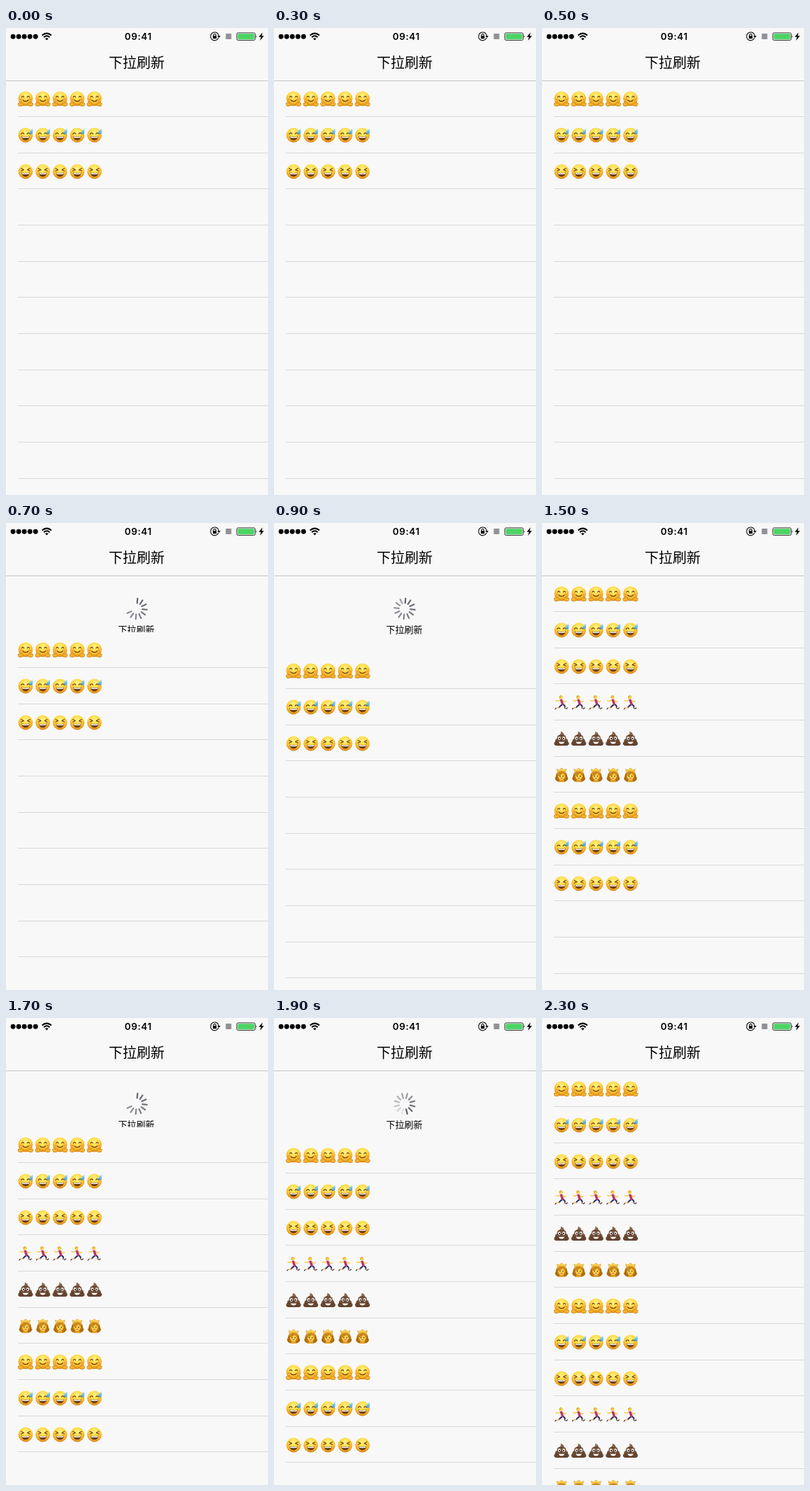
Recreate the animation shown at these times as an HTML page. Size 375 by 667 pixels, loop 2.4 s.

```html
<!DOCTYPE html>
<html lang="zh-CN">
<head>
<meta charset="utf-8">
<title>下拉刷新</title>
<style>
  html, body { margin: 0; width: 100%; height: 100%; overflow: hidden; background: #f8f8f8; }
  svg { display: block; }
  text { text-anchor: middle; font-family: "Noto Sans CJK SC", "Noto Sans CJK", sans-serif; }
  .clock { font: 600 13.5px Inter, sans-serif; letter-spacing: .55px; }
  .title { font-size: 20px; font-weight: 500; }
  .hint { font-size: 13px; }
  .line { fill: none; stroke-linecap: round; stroke-linejoin: round; }
</style>
</head>
<body>
<svg width="375" height="667" viewBox="0 0 375 667">
  <defs>
    <radialGradient id="skin" cx=".5" cy=".3" r=".72">
      <stop offset="0" stop-color="#fff38a"/>
      <stop offset=".45" stop-color="#fdd943"/>
      <stop offset=".8" stop-color="#f0a624"/>
      <stop offset="1" stop-color="#c97c14"/>
    </radialGradient>
    <linearGradient id="mud" x2="0" y2="1">
      <stop offset="0" stop-color="#8f6a50"/>
      <stop offset="1" stop-color="#60402c"/>
    </linearGradient>
    <linearGradient id="hair" x2="0" y2="1">
      <stop offset="0" stop-color="#e2a02a"/>
      <stop offset="1" stop-color="#a8660e"/>
    </linearGradient>
    <linearGradient id="drop" x2="0" y2="1">
      <stop offset="0" stop-color="#b9e6fb"/>
      <stop offset="1" stop-color="#2f9fe0"/>
    </linearGradient>

    <circle id="face" r="10.4" fill="url(#skin)"/>
    <g id="grin">
      <path d="M-5.8 1.5Q0 2.6 5.8 1.5Q5.2 7.4 0 7.4T-5.8 1.5Z" fill="#6f3f12"/>
      <path d="M-5.1 2Q0 3 5.1 2L4.7 3.7Q0 4.5 -4.7 3.7Z" fill="#fff"/>
    </g>
    <g id="hand">
      <path class="line" d="M5 9.4L4.4 6.6M6.6 8.8L6.2 5.2M8.2 8.8L8.5 5.4M9.2 9.2L10.2 7" stroke="#c87812" stroke-width="1.9"/>
      <ellipse cx="7.2" cy="8.7" rx="3.3" ry="2.2" fill="#d08215"/>
      <path class="line" d="M5 9L4.6 6.8M6.6 8.8L6.3 5.4M8.2 8.8L8.4 5.6M9 9L10 7.2" stroke="#fbc337" stroke-width="1.1"/>
      <ellipse cx="7.2" cy="8.6" rx="2.5" ry="1.5" fill="#f7b52e"/>
    </g>

    <g id="hug">
      <use href="#face" y="-.2"/>
      <ellipse cx="-6.2" cy="1" rx="2.3" ry="1.6" fill="#f4803a" opacity=".55"/>
      <ellipse cx="6.2" cy="1" rx="2.3" ry="1.6" fill="#f4803a" opacity=".55"/>
      <path class="line" d="M-5.5 -2.2Q-3.9 -5 -2.3 -2.2M2.3 -2.2Q3.9 -5 5.5 -2.2M-3.8 2Q0 5.4 3.8 2" stroke="#6b3a10" stroke-width="1.2"/>
      <use href="#hand"/>
      <use href="#hand" transform="scale(-1 1)"/>
    </g>
    <g id="sweat">
      <use href="#face"/>
      <path class="line" d="M-6.2 -1.6Q-4.3 -4.4 -2.2 -1.9M2.2 -1.9Q4.3 -4.4 6.2 -1.6" stroke="#6b3a10" stroke-width="1.2"/>
      <use href="#grin"/>
      <path d="M10.2 -9.6Q4.8 -5.6 5.7 -2.8Q6.8 -.5 9 -1.4Q11 -2.8 10.2 -9.6Z" fill="url(#drop)"/>
    </g>
    <g id="laugh">
      <use href="#face"/>
      <path class="line" d="M-6.4 -4.4L-2.6 -2.5L-6.4 -.8M6.4 -4.4L2.6 -2.5L6.4 -.8" stroke="#6b3a10" stroke-width="1.1"/>
      <use href="#grin"/>
    </g>
    <g id="run" class="line">
      <path d="M.8 3.4L-2 5.6L-3.6 7.4M2.6 3.4L4.6 5L5 8" stroke="#2b3166" stroke-width="2"/>
      <path d="M-3.8 7.4L-8 8.6M5.2 7.4L6.4 9" stroke="#f2b638" stroke-width="1.3"/>
      <path d="M-8 8.4L-9.2 9.8M6.2 9.4L8.6 8" stroke="#3a2e48" stroke-width="1.2"/>
      <path d="M-1.8 -3.4L-5.2 -1.6L-8.2 -2.4M1.4 -3L4 -.4L6.6 -1.4" stroke="#f7c440" stroke-width="1.4"/>
      <path d="M-.4 -2.8L1.4 2.4" stroke="#b8336f" stroke-width="3.4"/>
      <circle cx="-1" cy="-7.2" r="2.5" fill="#e3a426"/>
      <circle cx="-.5" cy="-6.6" r="1.9" fill="#fbd04a"/>
    </g>
    <g id="poop">
      <path d="M-1.4 -10.2C1.6 -9.4 3.6 -7.8 3.4 -5.2C6 -4.6 6.8 -2.6 6.4 0C9 .6 9.4 2.4 8.8 4C11.4 5.2 11.4 9.4 7.8 9.9H-7.8C-11.4 9.4 -11.4 5.2 -8.8 4C-9.4 2.4 -9 .6 -6.4 0C-6.8 -2.6 -6 -4.6 -3.6 -5C-1.2 -6.2 -.4 -7.8 -1.4 -10.2Z" fill="url(#mud)"/>
      <path class="line" d="M-3.4 -4.6Q.6 -3.6 3.2 -5M-6.2 .4Q-4 2 0 1.8T6.2 .2M-8.6 4.2Q-6 5.4 -4.6 5M8.6 4.2Q6 5.4 4.6 5" stroke="#4a2e20" stroke-width=".8"/>
      <g fill="#fff">
        <ellipse cx="-3.2" cy="-.4" rx="2" ry="2.4"/>
        <ellipse cx="3.2" cy="-.4" rx="2" ry="2.4"/>
        <path d="M-4.2 4.4Q0 5.2 4.2 4.4Q3.2 7.4 0 7.4T-4.2 4.4Z"/>
      </g>
      <circle cx="-2.9" cy="-.2" r="1.1" fill="#1c1410"/>
      <circle cx="2.9" cy="-.2" r="1.1" fill="#1c1410"/>
    </g>
    <g id="princess">
      <path d="M-6 -4Q0 -8 6 -4C8.6 -1.4 7.6 2 9.6 4.6Q8.6 8.6 4.6 9.4H-4.6Q-8.6 8.6 -9.6 4.6C-7.6 2 -8.6 -1.4 -6 -4Z" fill="url(#hair)"/>
      <path class="line" d="M-6.6 -1Q-6.8 4 -7.6 6.4M6.6 -1Q6.8 4 7.6 6.4" stroke="#8f560c" stroke-width=".9"/>
      <path d="M-2.2 5H2.2L4.4 10H-4.4Z" fill="#e3a02a"/>
      <ellipse cy="1.3" rx="4.9" ry="5.5" fill="#fdd34c"/>
      <path d="M-5.2 1.6Q-5.4 -4.8 0 -4.8T5.2 1.6Q3 -.6 2 -2.6Q-1 .2 -5.2 1.6Z" fill="#c98618"/>
      <path d="M-6 -4.8L-7 -8.6L-3.4 -7.2L0 -10.2L3.4 -7.2L7 -8.6L6 -4.8Q0 -6.6 -6 -4.8Z" fill="#fbd044" stroke="#c98a16" stroke-width=".5"/>
      <circle cx="-2.1" cy="1.5" r=".85" fill="#4a2a10"/>
      <circle cx="2.1" cy="1.5" r=".85" fill="#4a2a10"/>
      <path class="line" d="M-1.3 4.4Q0 5.2 1.3 4.4" stroke="#cf3d4c" stroke-width=".9"/>
    </g>
  </defs>

  <rect width="375" height="667" fill="#f8f8f8"/>

  <g id="control">
    <g id="spinner" stroke="#5b5b69" stroke-width="2.2" stroke-linecap="round"></g>
    <text class="hint" x="186.6" y="156.8">下拉刷新</text>
  </g>

  <g id="list">
    <rect y="76" width="375" height="667" fill="#f8f8f8"/>
  </g>

  <rect width="375" height="75" fill="#f8f8f8"/>
  <rect y="75" width="375" height="1" fill="#c4c4c6"/>
  <g id="dots"></g>
  <g class="line" stroke="#000" stroke-width="2" style="stroke-linecap:butt">
    <path d="M51.6 10.6Q58.3 4.6 65 10.6M54.1 13.2Q58.3 9.4 62.5 13.2"/>
    <path d="M58.3 17.6L56 15.2Q58.3 13.2 60.6 15.2Z" fill="#000" stroke="none"/>
  </g>
  <text class="clock" x="189.3" y="17">09:41</text>
  <g class="line" stroke="#000" stroke-width="1.1" transform="translate(-.3 0)">
    <path d="M304.3 14.6A5.9 5.9 0 1 1 304.9 11.4"/>
    <path d="M297.3 11.5V10.2A1.7 1.7 0 0 1 300.7 10.2V11.5"/>
    <rect x="296.4" y="11.3" width="5.2" height="4" rx=".5" fill="#000" stroke="none"/>
    <path d="M302.8 11.2H307.4L305.1 14Z" fill="#000" stroke="none"/>
  </g>
  <rect x="314.5" y="8" width="8" height="8" fill="#929296"/>
  <rect x="330.3" y="6.9" width="26.4" height="10.6" rx="2" fill="none" stroke="#333"/>
  <rect x="331.6" y="8.2" width="23.8" height="8" rx="1" fill="#4cd463"/>
  <path d="M357.6 10.3Q359.8 12.2 357.6 14.1Z" fill="#333"/>
  <path d="M367.2 6.2L361.8 12.7H365L363.6 18L369.2 11.2H365.9Z"/>
  <text class="title" x="187" y="57">下拉刷新</text>
</svg>

<script>
const LOOP = 2400, STEP = 100, ROW = 51.67, HOLD = 95;
const KINDS = ["hug", "sweat", "laugh", "run", "poop", "princess"];
// [time, pull distance]
const PULL = [
  [0, 0], [500, 0], [600, 28], [700, 80], [800, 104], [900, 110], [1000, 102], [1100, HOLD],
  [1200, HOLD], [1300, 73], [1400, 21], [1500, 0], [1600, 30], [1700, 80], [1800, 110],
  [1900, HOLD], [2000, HOLD], [2100, 73], [2200, 21], [2300, 0], [LOOP, 0]
];

const byId = id => document.getElementById(id);
const list = byId("list"), spinner = byId("spinner"), control = byId("control");
const clamp = v => Math.max(0, Math.min(1, v));
const times = (n, fn) => Array.from({ length: n }, (_, i) => fn(i)).join("");

byId("dots").innerHTML = times(5, i => `<circle cx="${10.1 + i * 8.05}" cy="12.2" r="3.45"/>`);
spinner.innerHTML = times(12, i => `<path d="M0 -8.2V-14.8" transform="rotate(${i * 30})"/>`);
list.insertAdjacentHTML("beforeend", times(12, row => {
  const y = Math.round(101.3 + row * ROW);
  const icons = times(5, i => `<use href="#${KINDS[row % 6]}" x="${28 + i * 24.65}" y="${y}"/>`);
  return `<rect x="17" y="${Math.round(126 + row * ROW)}" width="358" height="1" fill="#d8d8da"/>
    <g class="row">${icons}</g>`;
}));
const rows = [...list.querySelectorAll(".row")];
const blades = [...spinner.children];

function pullAt(t) {
  const i = PULL.findIndex(key => key[0] > t);
  const [t0, a] = PULL[i - 1], [t1, b] = PULL[i];
  return a + (b - a) * (t - t0) / (t1 - t0);
}

function bladeAlpha(i, t, pull, dragging) {
  if (dragging) return i < pull / 110 * 12 ? 0.95 - i * 0.035 : 0;
  const head = t < 1550 ? 3 + (t - 1200) * 0.012 : 6 + (t - 1900) * 0.012;
  const lag = (((head - i) % 12) + 12) % 12;
  return 1 - lag / 12 * 0.92;
}

function draw(t) {
  const pull = pullAt(t);
  const count = t < 1300 ? 3 : t < 2100 ? 9 : 15;
  const dragging = t <= 900 || (t >= 1500 && t <= 1800);
  const closing = (t >= 1300 && t < 1500) || t >= 2100;
  const size = closing ? clamp(pull / HOLD) : 1;

  list.setAttribute("transform", `translate(0 ${Math.round(pull)})`);
  rows.forEach((row, i) => row.style.display = i < count ? "" : "none");
  control.style.opacity = clamp(pull / 80);
  spinner.setAttribute("transform",
    `translate(187 122.5) rotate(${dragging ? 5 : -15}) scale(${size})`);
  blades.forEach((blade, i) => blade.style.opacity = bladeAlpha(i, t, pull, dragging));
}

const start = performance.now();
function tick() {
  const t = (performance.now() - start) % LOOP;
  draw(Math.floor(t / STEP) * STEP);
  requestAnimationFrame(tick);
}
tick();
</script>
</body>
</html>
```
